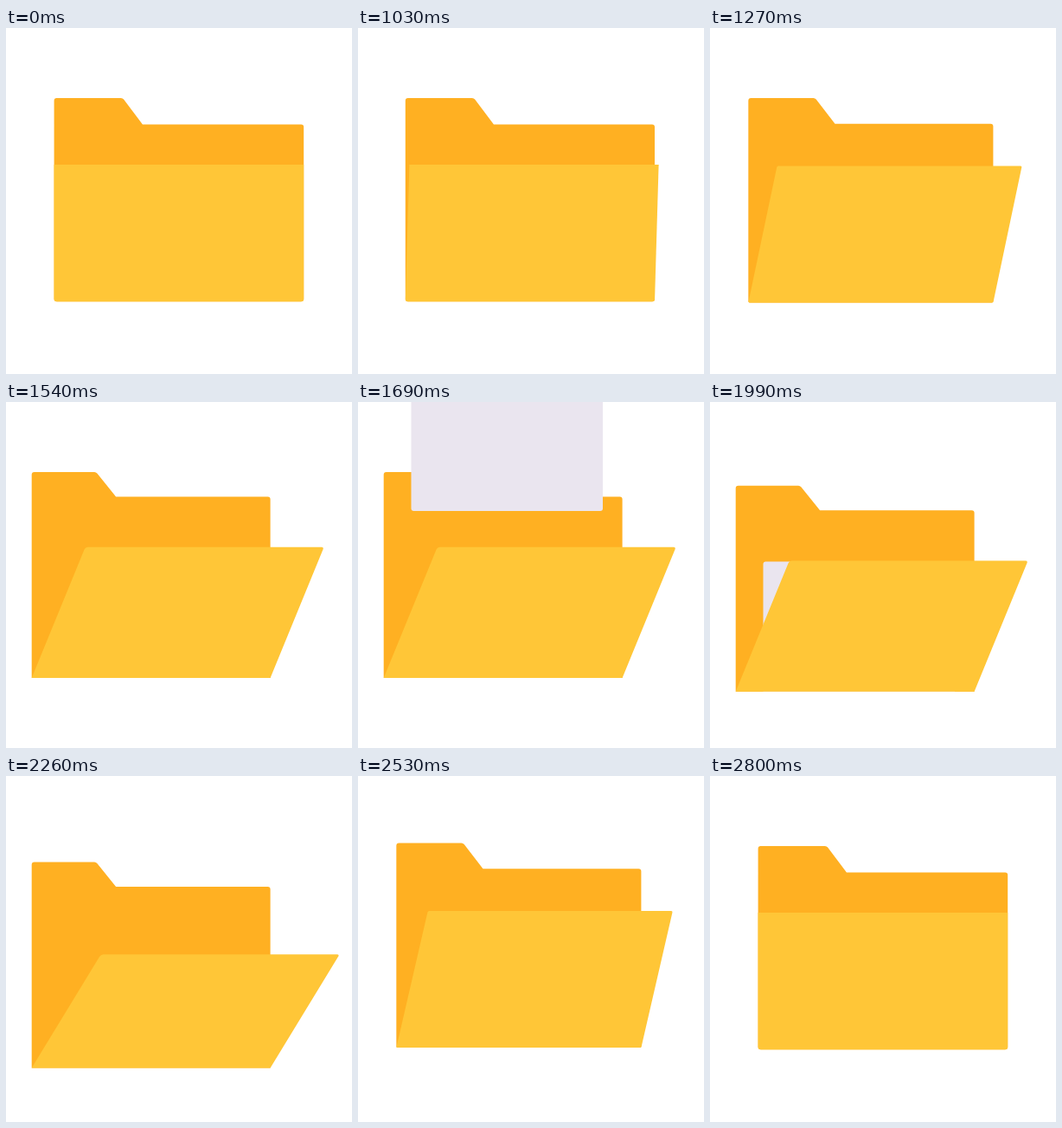
Recreate the animation shown at these times as an HTML page. Size 400 by 400 pixels, loop 2.83 s.

```html
<!DOCTYPE html>
<html lang="en">
<head>
<meta charset="utf-8">
<title>Folder</title>
<style>
  html, body { margin: 0; width: 100%; height: 100%; overflow: hidden; background: #fff; }
  svg { display: block; width: 100%; height: 100%; }
</style>
</head>
<body>
<svg viewBox="0 0 400 400">
  <path id="back" fill="#ffb022"/>
  <path id="paper" fill="#eae5ef"/>
  <path id="flap" fill="#ffc637"/>
</svg>
<script>
const LOOP = 2830, START = 1030, STEP = 30;
const OPEN = 1000, OPENED = 1540, LANDED = 1900, CLOSE = 2260, CLOSED = 2800;
const PAPER = { left: 61.5, right: 283, height: 265, gone: 2080 };
const LEAN = 62, RADIUS = 3;

const progress = (t, from, to) => Math.min(Math.max((t - from) / (to - from), 0), 1);
const smooth = p => p * p * (3 - 2 * p);
const mix = (a, b, p) => a + (b - a) * p;

const openness = t => progress(t, OPEN, OPENED) - progress(t, CLOSE, CLOSED);

// The landing paper pushes the folder down; it swings back like a damped spring.
function dip(t) {
  const u = Math.max(t - LANDED, 0);
  return 37.9 * Math.exp(-0.0017 * u) * Math.sin(Math.PI * u / 560);
}

// The flap is knocked further open a little later, then relaxes.
const knock = t => smooth(progress(t, 2030, 2190)) * Math.exp(-Math.max(t - 2190, 0) / 245);

// Closed polygon from [x, y, corner radius] points.
function polygon(points) {
  const toward = ([x, y, r], [px, py]) => {
    const k = Math.min(r / Math.hypot(px - x, py - y), 0.5);
    return `${mix(x, px, k)} ${mix(y, py, k)}`;
  };
  const n = points.length;
  return points.map((p, i) => {
    const prev = points[(i + n - 1) % n], next = points[(i + 1) % n];
    return `${i ? 'L' : 'M'}${toward(p, prev)}Q${p[0]} ${p[1]} ${toward(p, next)}`;
  }).join('') + 'Z';
}

const draw = (id, points) =>
  document.getElementById(id).setAttribute('d', points ? polygon(points) : '');

// The paper drops with slight acceleration and is cut off at the folder's floor.
function paperShape(t, floor) {
  const p = progress(t, OPENED, PAPER.gone);
  if (p === 0 || p === 1) return null;
  const { left, right, height } = PAPER;
  const y = -height + 411 * p + 154 * p * p;
  const end = Math.min(y + height, floor);
  const foot = end < floor ? RADIUS : 0;
  return [[left, y, RADIUS], [right, y, RADIUS], [right, end, foot], [left, end, foot]];
}

function render(t) {
  const open = openness(t), slide = open ** 1.2, sink = dip(t) * Math.sqrt(open);
  const left = mix(55.6, 29.7, slide), right = mix(344.2, 305.6, slide);
  const top = 81 + sink, bottom = mix(316.2, 319, slide) + sink;
  const notch = left + mix(79.3, 74.4, slide), step = top + mix(30.6, 28.4, slide);

  const lean = (LEAN + 24 * knock(t)) * open ** 0.9;
  const lip = bottom - 158.3 + 7 * (lean / LEAN) ** 5.3;
  const round = RADIUS * Math.min(lean / LEAN, 1), foot = RADIUS - round;

  draw('back', [
    [left, top, RADIUS], [notch, top, 2], [notch + 23, step, 0],
    [right, step, RADIUS], [right, bottom, foot], [left, bottom, foot]
  ]);
  draw('paper', paperShape(t, bottom));
  draw('flap', [
    [left + lean, lip, round], [right + lean, lip, round],
    [right, bottom, foot], [left, bottom, foot]
  ]);
}

const origin = performance.now();
function tick() {
  const t = (performance.now() - origin) % LOOP;
  render(t < START ? 0 : START + STEP * Math.floor((t - START) / STEP));
  requestAnimationFrame(tick);
}
tick();
</script>
</body>
</html>
```
